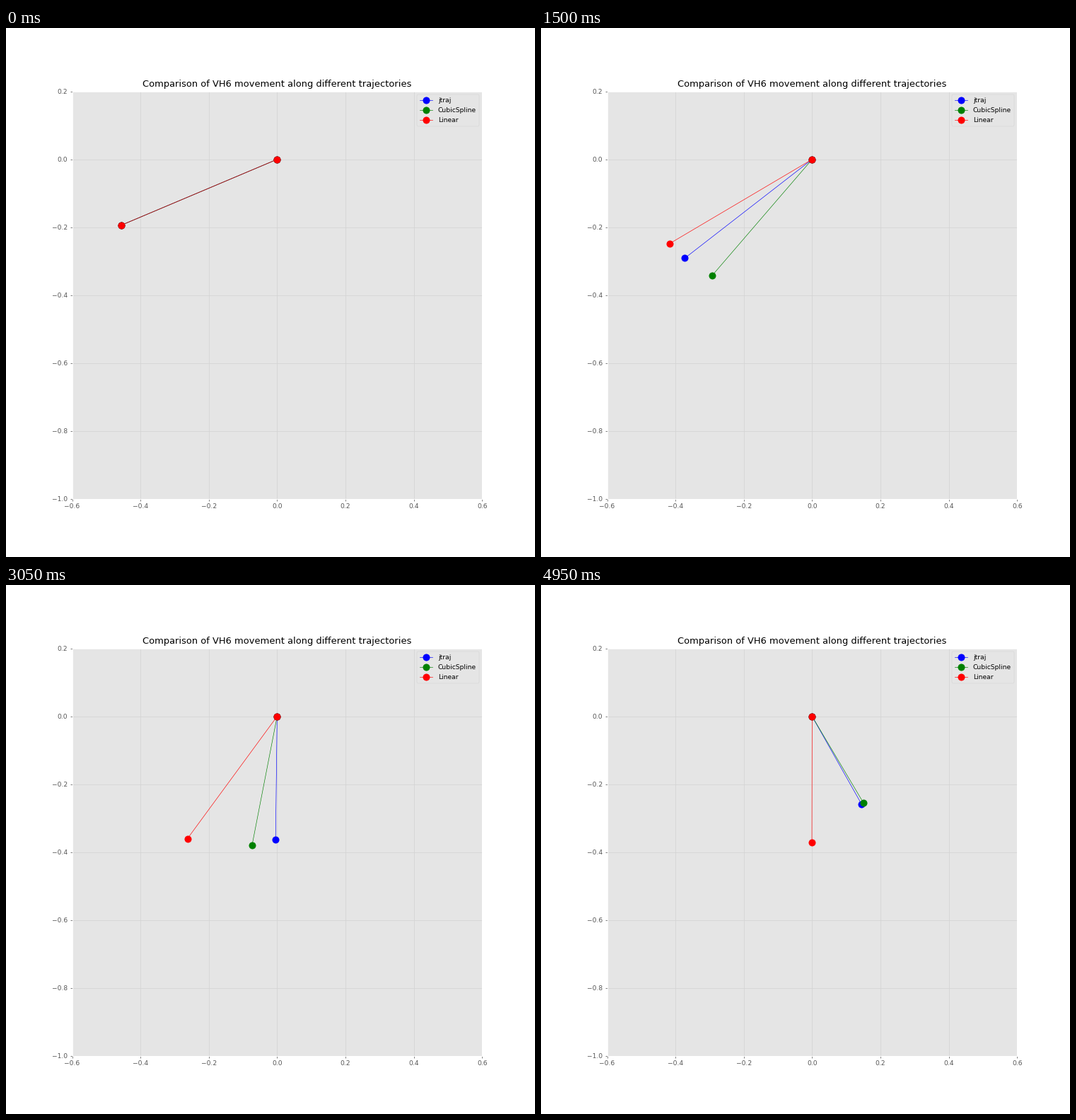
Write a matplotlib script that moves like this. It is 748 by 748 pixels and loops after 5000 ms.

```python
import matplotlib.pyplot as plt
import numpy as np
from matplotlib.animation import FuncAnimation

SIZE, DPI = 748, 65.5
FRAMES, INTERVAL = 100, 50

# Link lengths of the arm in metres
ARM, SHOULDER, WRIST, TOOL = 0.4569, 0.11235, 0.08535, 0.0819
# Joint angles at the end of the full move; all start at zero
PAN, LIFT, PITCH, TWIST = 1.44, 0.743, 0.96, -0.646


def tool_position(pan, arm):
    """Top view of the tool, given the progress of the base and of the arm."""
    reach = (-ARM * np.cos(LIFT * arm) + WRIST * np.sin(PITCH * arm)
             - TOOL * np.cos(PITCH * arm) * np.sin(TWIST * arm))
    side = SHOULDER + TOOL * np.cos(TWIST * arm)
    c, s = np.cos(PAN * pan), np.sin(PAN * pan)
    return c * reach + s * side, s * reach - c * side


def quintic(u):
    return 10 * u**3 - 15 * u**4 + 6 * u**5


def spline(u):
    return 0.957 * u + 0.055 * u**2.5


def slow_start(u):
    """Smoothstep that starts late and is cut off before it ends."""
    t = 0.678 * max(u - 0.035, 0)
    return 3 * t**2 - 2 * t**3


# Label, colour, easing, speed of the arm joints relative to the base
MOVES = [
    ("jtraj", "blue", quintic, 1),
    ("CubicSpline", "green", spline, 1),
    ("Linear", "red", slow_start, 0.935),
]

plt.style.use("ggplot")
plt.rcParams["font.family"] = "DejaVu Sans"

# The tiny surplus keeps the pixel size from rounding down.
side = (SIZE + 1e-6) / DPI
fig, ax = plt.subplots(figsize=(side, side), dpi=DPI, facecolor="white")
fig.subplots_adjust(left=0.125, right=0.9, bottom=0.11, top=0.88)
ax.set(xlim=(-0.6, 0.6), ylim=(-1.0, 0.2))
ax.set_xticks(np.linspace(-0.6, 0.6, 7))
ax.set_yticks(np.linspace(-1.0, 0.2, 7))
ax.grid(color="lightgray", linewidth=0.8)
ax.set_title("Comparison of VH6 movement along different trajectories",
             fontsize=14.25, pad=7.8)

lines = [ax.plot([], [], "o-", color=color, label=label,
                 linewidth=0.7, markersize=10)[0]
         for label, color, _, _ in MOVES]
ax.legend(loc="upper right", fontsize=10.1, labelspacing=0.54)


def draw(i):
    u = i / (FRAMES - 1)
    for line, (_, _, ease, ratio) in zip(lines, MOVES):
        s = ease(u)
        x, y = tool_position(s, ratio * s)
        line.set_data([0, x], [0, y])
    return lines


anim = FuncAnimation(fig, draw, frames=FRAMES, interval=INTERVAL,
                     repeat=True, repeat_delay=0)
plt.show()
```
